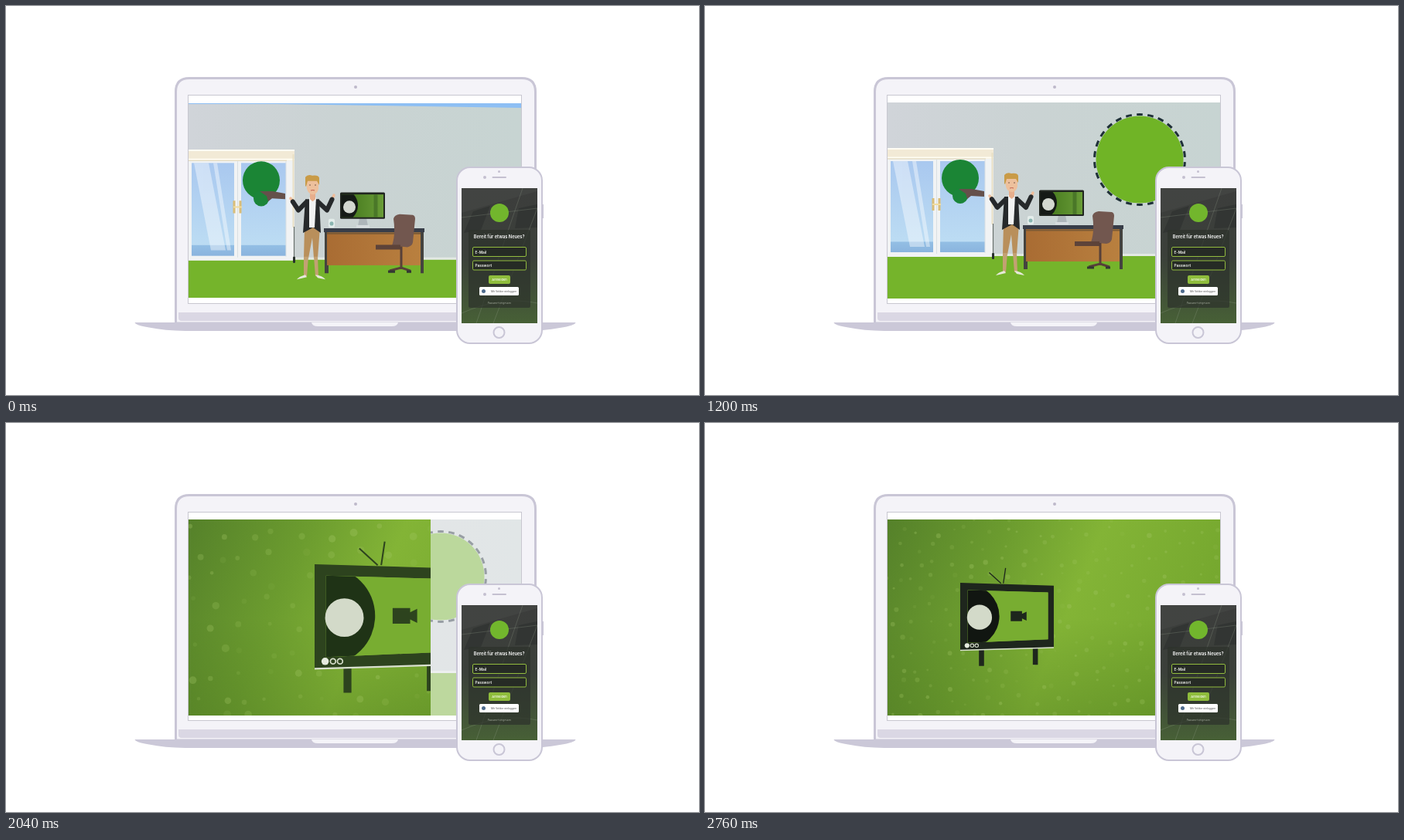
An HTML page that plays this animation: 896x504 px, repeating every 2880 ms.

```html
<!DOCTYPE html>
<html lang="de">
<head>
<meta charset="utf-8">
<title>Laptop und Telefon</title>
<style>
html, body { margin: 0; width: 100%; height: 100%; overflow: hidden; background: #fff; }
svg { display: block; width: 896px; height: 504px; }
text { font-family: Inter, "Open Sans", sans-serif; }
</style>
</head>
<body>
<svg viewBox="0 0 896 504" xmlns="http://www.w3.org/2000/svg">
  <defs>
    <clipPath id="screen"><rect id="video" x="236" width="430"/></clipPath>
    <clipPath id="phone"><rect x="589" y="236" width="98" height="175"/></clipPath>
    <clipPath id="wipe"><rect id="wipeBox" x="236" y="125" height="255"/></clipPath>
    <clipPath id="tvGlass"><path d="M389 204 531 208V291L389 297Z"/></clipPath>
    <clipPath id="monGlass"><rect x="434" y="241" width="54" height="29"/></clipPath>
    <clipPath id="pane"><rect x="240" y="201" width="55" height="118"/></clipPath>
    <linearGradient id="wall"><stop stop-color="#d0d4d9"/><stop offset=".45" stop-color="#cad3d3"/><stop offset="1" stop-color="#c7d4d2"/></linearGradient>
    <linearGradient id="sky" x2="0" y2="1"><stop stop-color="#a9c8ef"/><stop offset=".88" stop-color="#bcdcf3"/><stop offset=".89" stop-color="#93bee4"/><stop offset="1" stop-color="#8ab4de"/></linearGradient>
    <linearGradient id="wood"><stop stop-color="#a96c33"/><stop offset="1" stop-color="#b9803f"/></linearGradient>
    <linearGradient id="glass"><stop stop-color="#3f7219"/><stop offset="1" stop-color="#699c37"/></linearGradient>
    <linearGradient id="paper" y2=".25"><stop stop-color="#55812a"/><stop offset=".35" stop-color="#6c9c2f"/><stop offset=".62" stop-color="#83b436"/><stop offset="1" stop-color="#76a82f"/></linearGradient>
    <linearGradient id="shade" x2="0" y2="1"><stop offset=".5" stop-color="#2f5714" stop-opacity="0"/><stop offset="1" stop-color="#2f5714" stop-opacity=".22"/></linearGradient>
    <linearGradient id="night" x2="0" y2="1"><stop stop-color="#3c3d3c"/><stop offset=".5" stop-color="#3b403a"/><stop offset="1" stop-color="#476036"/></linearGradient>
  </defs>

  <!-- laptop -->
  <path d="M219.500 411V111Q219.500 93.500 237 93.500H667Q684.500 93.500 684.500 111V411Z" fill="#f4f3f8" stroke="#c9c6d6" stroke-width="3"/>
  <circle cx="452" cy="105" r="2" fill="#bdb9ca"/>
  <path d="M223 397H681V408H227Q223 408 223 404Z" fill="#dad7e4"/>
  <path d="M166.500 410H736.500Q736 414 716 417 695 421 670 421H232Q205 420.500 185 416.500 167 413.500 166.500 410Z" fill="#cbc8d8"/>
  <path d="M395 410H507Q506 415 499 415H403Q396 415 395 410Z" fill="#f4f3f8"/>
  <rect x="235.500" y="115.500" width="431" height="270" fill="#fff" stroke="#c8c7d0"/>

  <g clip-path="url(#screen)">
    <rect x="236" y="125" width="431" height="255" fill="url(#wall)"/>
    <path id="strip" d="M236 125H667V132L350 127 236 127Z" fill="#8dbff4"/>
    <g id="room">
      <rect x="236" y="323" width="431" height="70" fill="#75b42b"/>
      <rect x="236" y="321" width="431" height="3" fill="#e3e9e4"/>
      <!-- terrace door -->
      <rect x="236" y="196" width="137" height="129" fill="#f1f3f4"/>
      <rect x="240" y="201" width="55" height="118" fill="url(#sky)"/>
      <rect x="304" y="201" width="58" height="118" fill="url(#sky)"/>
      <g clip-path="url(#pane)" fill="#fff" opacity=".42"><path d="M243 201H262L284 312H265Z"/><path d="M268 201H273L291 312H286Z"/></g>
      <circle cx="330" cy="223" r="24" fill="#1b8535"/>
      <circle cx="330" cy="246" r="10" fill="#1b8539"/>
      <path d="M328 237 345 237 361 240V247L344 246 339 250 337 243Z" fill="#65504b"/>
      <path d="M362 199V320M299.500 199V321" stroke="#d9dfe2" fill="none"/>
      <rect x="236" y="184" width="137" height="14" fill="#f2ead6"/>
      <path d="M236 185H373M236 196.500H373" stroke="#fffdf4" stroke-width="2"/>
      <path d="M236 198H363" stroke="#ddd3b5"/>
      <path d="M295 249V265M303 249V265" stroke="#d9bd78" stroke-width="3"/>
      <path d="M294 257H305" stroke="#f0dca0" stroke-width="2"/>
      <path d="M371.500 190V283" stroke="#e8dfc4" stroke-width="2"/>
      <path d="M372.500 282V326" stroke="#67706c" stroke-width="1.200"/>
      <rect x="371" y="320" width="3" height="8" rx="1" fill="#27302c"/>
      <!-- desk -->
      <path d="M412 288H417V341H412ZM536 288H540V341H536Z" fill="#44433f"/>
      <rect x="415" y="289" width="121" height="42" fill="url(#wood)"/>
      <path d="M415 290.500H536" stroke="#7c5a35" stroke-width="2"/>
      <rect x="411" y="284" width="130" height="5" fill="#383d48"/>
      <rect x="417" y="272" width="8" height="11" rx="2" fill="#e4edeb"/>
      <circle cx="421" cy="278" r="2.500" fill="#8ab5b0"/>
      <path d="M457 271H466L468 281H455Z" fill="#aeb6ba"/>
      <rect x="453" y="280" width="17" height="3" fill="#d8dddf"/>
      <rect x="432" y="238.500" width="58" height="33.500" rx="1.500" fill="#20251f"/>
      <rect x="434" y="241" width="54" height="29" fill="url(#glass)"/>
      <g clip-path="url(#monGlass)"><circle cx="434" cy="255" r="21" fill="#151a16"/><path d="M478 241V270" stroke="#345c20" stroke-width="5" opacity=".5"/></g>
      <circle cx="444" cy="257" r="8" fill="#d3d8d0"/>
      <!-- chair -->
      <path d="M501 272Q502 267 509 266L526 267Q529 268 529 272L526 302Q525 307 519 308L499 306Q504 292 501 272Z" fill="#72574f"/>
      <path d="M478 305H510V311H478Z" fill="#5d4339"/>
      <path d="M511 307V336M496 338 511 334 523 338" stroke="#574039" stroke-width="3" fill="none"/>
      <path d="M494 339H503M518 339H524" stroke="#333733" stroke-width="3"/>
      <!-- man -->
      <path d="M386 282H406L403 322H398L396 296 391 322H385Z" fill="#b98f5b"/>
      <path d="M385 320H391L389 345H385ZM398 320H403L404 345H400Z" fill="#c3a173"/>
      <path d="M376 349Q379 345 387 343L389 346ZM400 343Q409 344 413 349L403 347Z" fill="#e6ead9"/>
      <path d="M387 247 405 247 407 290 397 283 384 290Z" fill="#26292b"/>
      <path d="M392 245H401L399 283H392Z" fill="#f1f2f2"/>
      <path d="M393 237H400V247L396.500 250 393 247Z" fill="#e7ae8c"/>
      <g id="arms" fill="none" stroke-linecap="round" stroke-linejoin="round"></g>
      <path d="M388 223H404V234Q402 241 397 241 391 241 389 234Z" fill="#edc09c"/>
      <path d="M387 230V219Q390 215 396 217 404 216 405 220V229L402 224 390 224 388 231Z" fill="#c99b47"/>
      <path d="M392 229H394M399 229H401" stroke="#79594a"/>
      <path d="M394 236Q397 235 399 236" stroke="#c4604f" fill="none"/>
    </g>
    <g id="badge">
      <circle id="disc" cx="562" cy="199" fill="#70b426"/>
      <circle id="ring" cx="562" cy="199" r="58.500" fill="none" stroke="#1f3038" stroke-width="3" pathLength="26" stroke-dasharray=".55 .45" stroke-dashoffset="-.225"/>
    </g>
    <rect id="fogL" x="236" y="125" width="148" height="255" fill="#f4f4f6"/>
    <rect id="fogR" x="384" y="125" width="283" height="255" fill="#f6f5f8"/>
    <g id="green" clip-path="url(#wipe)">
      <rect x="236" y="125" width="431" height="255" fill="url(#paper)"/>
      <rect x="236" y="125" width="431" height="255" fill="url(#shade)"/>
      <g id="set">
        <g id="spots" fill="#a4c866"></g>
        <g id="ink">
          <path d="M448 192 427 173M452 192 456 165" stroke-width="1.800"/>
          <path d="M409 306H418V338H409ZM504 304H513V336H504Z" stroke="none"/>
          <path d="M376 191 541 196V305L376 310ZM389 204V297L531 291V208Z" fill-rule="evenodd" stroke="none"/>
        </g>
        <path d="M376 310.500 541 305.500" stroke="#d8dfce" stroke-width="2"/>
        <g clip-path="url(#tvGlass)">
          <rect x="389" y="203" width="143" height="95" fill="#78ad31"/>
          <circle id="dark" cx="389" cy="250" r="56"/>
        </g>
        <circle cx="410" cy="252" r="22" fill="#d3dac9"/>
        <path id="cam" d="M465 241H485V246L493 242V258L485 254V259H465Z"/>
        <circle cx="388" cy="302" r="4.200" fill="#e6ebdf"/>
        <g fill="none" stroke="#d5dcca" stroke-width="1.500"><circle cx="397" cy="302" r="3"/><circle cx="405" cy="302" r="3"/></g>
      </g>
    </g>
  </g>

  <!-- phone -->
  <path d="M694 257V275" stroke="#c9c6d6" stroke-width="2"/>
  <rect x="583" y="209" width="110" height="228" rx="17" fill="#f4f3f8" stroke="#c9c6d6" stroke-width="2"/>
  <circle cx="637.500" cy="214.500" r="1.500" fill="#c4c0d0"/>
  <circle cx="619" cy="222" r="2" fill="#c4c0d0"/>
  <path d="M629.500 222H646" stroke="#c4c0d0" stroke-width="2" stroke-linecap="round"/>
  <circle cx="637.500" cy="423" r="7" fill="none" stroke="#c9c6d6" stroke-width="2"/>
  <g clip-path="url(#phone)">
    <rect x="589" y="236" width="98" height="175" fill="url(#night)"/>
    <path d="M589 268 687 240V236H589Z" fill="#4b4c4b" opacity=".45"/>
    <path d="M604 266 626 259 614 290 592 294ZM663 262 687 257V287L658 288Z" fill="#2c302d" opacity=".6"/>
    <g stroke="#9ba692" fill="none" opacity=".25"><path d="M589 274 687 262M668 236 608 411M687 262 630 411M589 398Q640 375 687 385"/></g>
    <rect x="598" y="290" width="80" height="101" rx="2" fill="#2d322c" opacity=".72"/>
    <circle cx="638" cy="268" r="12" fill="#72b62d"/>
    <text x="637.700" y="301" font-size="5.700" font-weight="600" fill="#fff" text-anchor="middle">Bereit für etwas Neues?</text>
    <g fill="#262b25" stroke="#92bb3f"><rect x="603.500" y="312.500" width="69" height="12" rx="1.500"/><rect x="603.500" y="330" width="69" height="12" rx="1.500"/></g>
    <g font-size="4.800" font-weight="600" fill="#f0f2ed"><text x="606.500" y="320.500">E-Mail</text><text x="606.500" y="338">Passwort</text></g>
    <rect x="624" y="349" width="28" height="11" rx="2" fill="#8fbd3c"/>
    <text x="638" y="356" font-size="4" font-weight="500" fill="#fff" text-anchor="middle">Anmelden</text>
    <rect x="612" y="364" width="51" height="11" rx="1.500" fill="#fff"/>
    <circle cx="617.500" cy="369.500" r="2.500" fill="#4e6b8d"/>
    <text x="643.500" y="370.800" font-size="3.400" fill="#555" text-anchor="middle">Mit Veldor einloggen</text>
    <text x="638" y="385.500" font-size="3.200" fill="#a3aa9c" text-anchor="middle">Passwort vergessen</text>
  </g>
</svg>
<script>
const LOOP = 2880, STEP = 120;
const el = id => document.getElementById(id);
const set = (id, attrs) => { for (const k in attrs) el(id).setAttribute(k, attrs[k]); };
const clamp = v => Math.max(0, Math.min(1, v));
const ramp = (t, a, b) => clamp((t - a) / (b - a));
const mix = (a, b, p) => a + (b - a) * p;
const ease = p => p * p * (3 - 2 * p);

// wallpaper spots on a jittered grid
let seed = 7;
const rnd = () => (seed = seed * 16807 % 2147483647) / 2147483647;
let spots = "";
for (let y = 65; y < 450; y += 27)
  for (let x = 225; x < 860; x += 31)
    spots += `<circle cx="${(x + rnd() * 22).toFixed(1)}" cy="${(y + rnd() * 18).toFixed(1)}" r="${(2 + rnd() * 2.5).toFixed(1)}" opacity="${(0.08 + rnd() * 0.25).toFixed(2)}"/>`;
el("spots").innerHTML = spots;

// shoulder, elbow and hand: lowered, then raised
const LEFT = [[388, 251, 388, 250], [378, 261, 374, 238], [368, 246, 365, 215]];
const RIGHT = [[404, 251, 404, 250], [415, 261, 417, 238], [424, 242, 424, 221]];

function arm(joints, p) {
  const [s, e, h] = joints.map(j => [mix(j[0], j[2], p), mix(j[1], j[3], p)]);
  const w = [mix(e[0], h[0], .72), mix(e[1], h[1], .72)];
  return `<path d="M${w}L${h}" stroke="#efbd9b" stroke-width="3.5"/>` +
    `<path d="M${s}L${e}L${w}" stroke="#26292b" stroke-width="6"/>`;
}

function draw(t) {
  const settle = 1 - ramp(t, 0, 300);
  const k = 1 + .02 * settle;
  set("room", { transform: `matrix(1 0 0 ${k} 0 ${184 - 184 * k + 2 * settle})` });
  set("strip", { opacity: 1 - ramp(t, 0, 240) });
  const grow = ramp(t, 360, 600);
  set("video", { y: 126 - grow, height: 252 + 2 * grow });

  const raise = ease(ramp(t, 60, 360)) - ease(ramp(t, 480, 800)) + ease(ramp(t, 1240, 1600));
  el("arms").innerHTML = arm(LEFT, raise) + arm(RIGHT, raise);

  const pop = ramp(t, 120, 360);
  set("disc", { r: mix(36, 56.5, ease(pop)), opacity: .68 * pop + .32 * ramp(t, 360, 600) });
  set("ring", { opacity: ramp(t, 400, 640) });

  set("fogL", { opacity: .16 * ramp(t, 1500, 1680) });
  set("fogR", { opacity: .3 * ramp(t, 1500, 1680) + .35 * ramp(t, 1680, 2160) });

  const edge = t <= 2280 ? mix(384, 659, ramp(t, 1680, 2280)) : 667;
  set("wipeBox", { width: edge - 236 });
  set("green", { opacity: ramp(t, 1680, 2040) });

  // camera pulls back from the television
  const q = (t - 2280) / 480;
  const z = mix(1, .733, q);
  set("set", { transform: `translate(${mix(376, 330, q)} ${mix(191, 207, q)}) scale(${z}) translate(-376 -191)` });
  const p = clamp(q);
  const ink = `rgb(${mix(45, 30, p)},${mix(67, 38, p)},${mix(30, 29, p)})`;
  set("ink", { fill: ink, stroke: ink });
  set("dark", { fill: `rgb(${mix(31, 17, p)},${mix(51, 22, p)},${mix(22, 17, p)})` });
  set("cam", { fill: ink });
}

const start = performance.now();
function tick() {
  const t = (performance.now() - start) % LOOP;
  draw(Math.floor(t / STEP) * STEP);
  requestAnimationFrame(tick);
}
tick();
</script>
</body>
</html>
```
